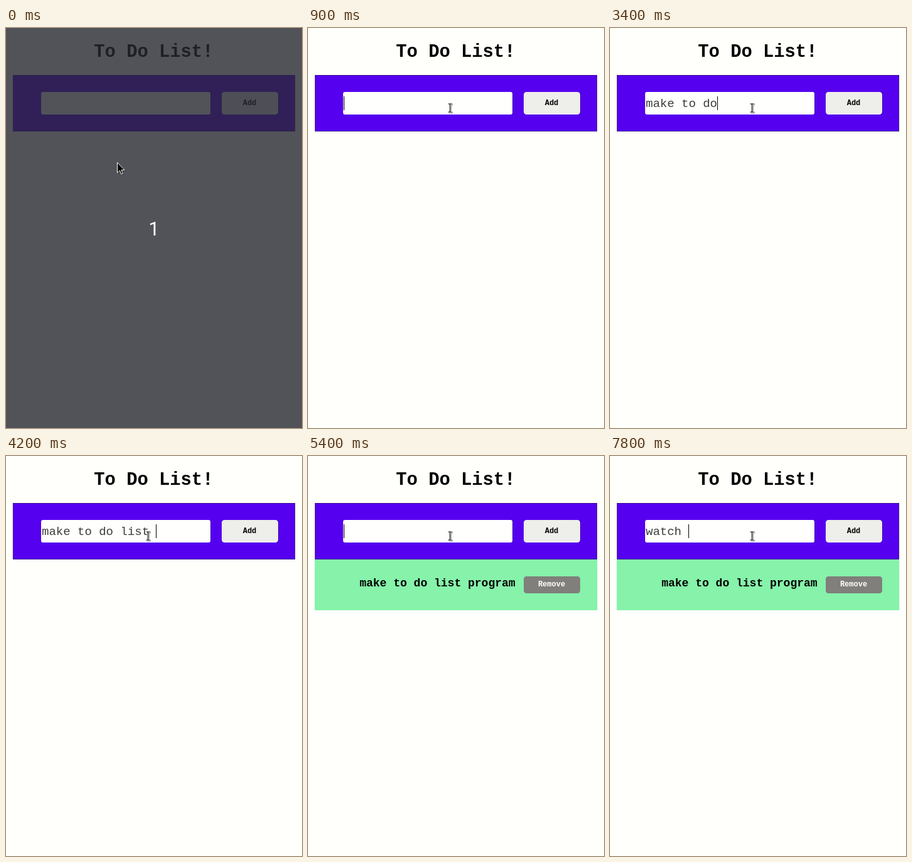
Animation of 472 by 638 pixels, one loop 8000 ms. Source, as an HTML page:

```html
<!DOCTYPE html>
<html lang="en">
<head>
<meta charset="utf-8">
<title>To Do List</title>
<style>
  html, body { margin: 0; width: 100%; height: 100%; overflow: hidden; background: #fffffc; }
  svg { display: block; width: 472px; height: 638px; }
  text { font-family: "Courier New", "Liberation Mono", monospace; white-space: pre; }
  .bold { font-weight: 700; }
  .mid { text-anchor: middle; }
  .label { font-size: 12px; }
  .count { font: 31px Roboto, "Liberation Sans", sans-serif; }
  .raised { filter: drop-shadow(1px .5px 0 rgb(0 0 0 / .3)); }
  .pointer { filter: drop-shadow(1px 1px .5px rgb(0 0 0 / .45)); }
</style>
</head>
<body>
<svg viewBox="0 0 472 638">
  <rect width="472" height="638" fill="#fffffc"/>
  <text class="bold mid" x="235.4" y="46" font-size="28.8">To Do List!</text>

  <rect x="11.4" y="75.5" width="449.2" height="89" fill="#5600f0" stroke="#340a92"/>
  <rect class="raised" x="56" y="102" width="270" height="36" rx="3" fill="#fffffd"/>
  <rect class="raised" x="344" y="102" width="90" height="36" rx="4.5" fill="#eeeeeb"/>
  <text class="bold mid label" x="388.5" y="123">Add</text>
  <text id="entry" x="57" y="126" font-size="19" fill="#3c3c3c"></text>
  <rect id="caret" y="109" width="1" height="22"/>

  <g id="item">
    <rect x="10.7" y="165" width="450.6" height="81" fill="#86f2aa"/>
    <text class="bold" x="82.2" y="208" font-size="18">make to do list program</text>
    <rect x="344" y="192" width="90" height="27" rx="4.5" fill="#807f7b"/>
    <text class="bold mid label" x="388.5" y="208" fill="#fffffc">Remove</text>
  </g>

  <g id="veil">
    <rect width="472" height="638" fill="#272931" opacity=".8"/>
    <text class="count mid" x="236" y="331" fill="#fff">1</text>
  </g>

  <path id="arrow" class="pointer" d="M.5 .5V17L4.4 13.4 7 19.3 9.4 18.2 6.9 12.5H12Z" stroke="#fff"/>
  <g id="beam" class="pointer" fill="none">
    <path d="M-3 -6.5H3M0 -6.5V6.5M-3 6.5H3" stroke="#fff" stroke-width="3"/>
    <path d="M-3 -6.5H3M0 -6.5V6.5M-3 6.5H3" stroke="#000" stroke-width="1.2"/>
  </g>
</svg>
<script>
  const LOOP = 8000, FRAME = 100, ADVANCE = 11.4;
  const UNVEIL = 400, CLICK = 900, KEY_GAP = 85;

  // Bursts of typing by start time; "<" is backspace, "\n" adds the task.
  const bursts = {
    1500: "m", 1720: "ake to", 2400: " ", 2600: "do", 3100: "<", 3400: "o",
    3700: " list ", 4400: "prog", 4900: "ra", 5400: "\n",
    6500: "w<w", 7000: "a", 7210: "tc", 7500: "h", 7800: " "
  };

  const el = id => document.getElementById(id);
  const show = (id, on) => el(id).setAttribute("visibility", on ? "visible" : "hidden");
  const move = (id, x, y) => el(id).setAttribute("transform", `translate(${x} ${y})`);
  const ease = p => p * p * (3 - 2 * p);

  function typeUntil(t) {
    let entry = "", added = false;
    for (const [start, keys] of Object.entries(bursts)) {
      [...keys].forEach((key, i) => {
        if (+start + i * KEY_GAP > t) return;
        if (key === "\n") { entry = ""; added = true; }
        else entry = key === "<" ? entry.slice(0, -1) : entry + key;
      });
    }
    return { entry, added };
  }

  function drawPointer(t) {
    const p = ease(Math.min(1, Math.max(0, t - UNVEIL) / 400));
    const lead = t < UNVEIL ? -1 : 0;
    const x = Math.round(180 + 46 * p + 3 * lead);
    const y = Math.round(207 - 80 * p - 7 * lead);
    const overField = y < 138;
    move("arrow", x, y);
    move("beam", x + .5, y + .5);
    show("arrow", !overField);
    show("beam", overField);
  }

  function render(time) {
    const t = Math.floor(time / FRAME + 1e-6) * FRAME;
    const { entry, added } = typeUntil(t);
    el("entry").textContent = entry;
    el("caret").setAttribute("x", Math.round(57 + entry.length * ADVANCE));
    show("caret", t >= CLICK);
    show("item", added);
    show("veil", t < UNVEIL);
    drawPointer(t);
  }

  let start;
  function tick(now) {
    start ??= now;
    render((now - start) % LOOP);
    requestAnimationFrame(tick);
  }
  render(0);
  requestAnimationFrame(tick);
</script>
</body>
</html>
```
